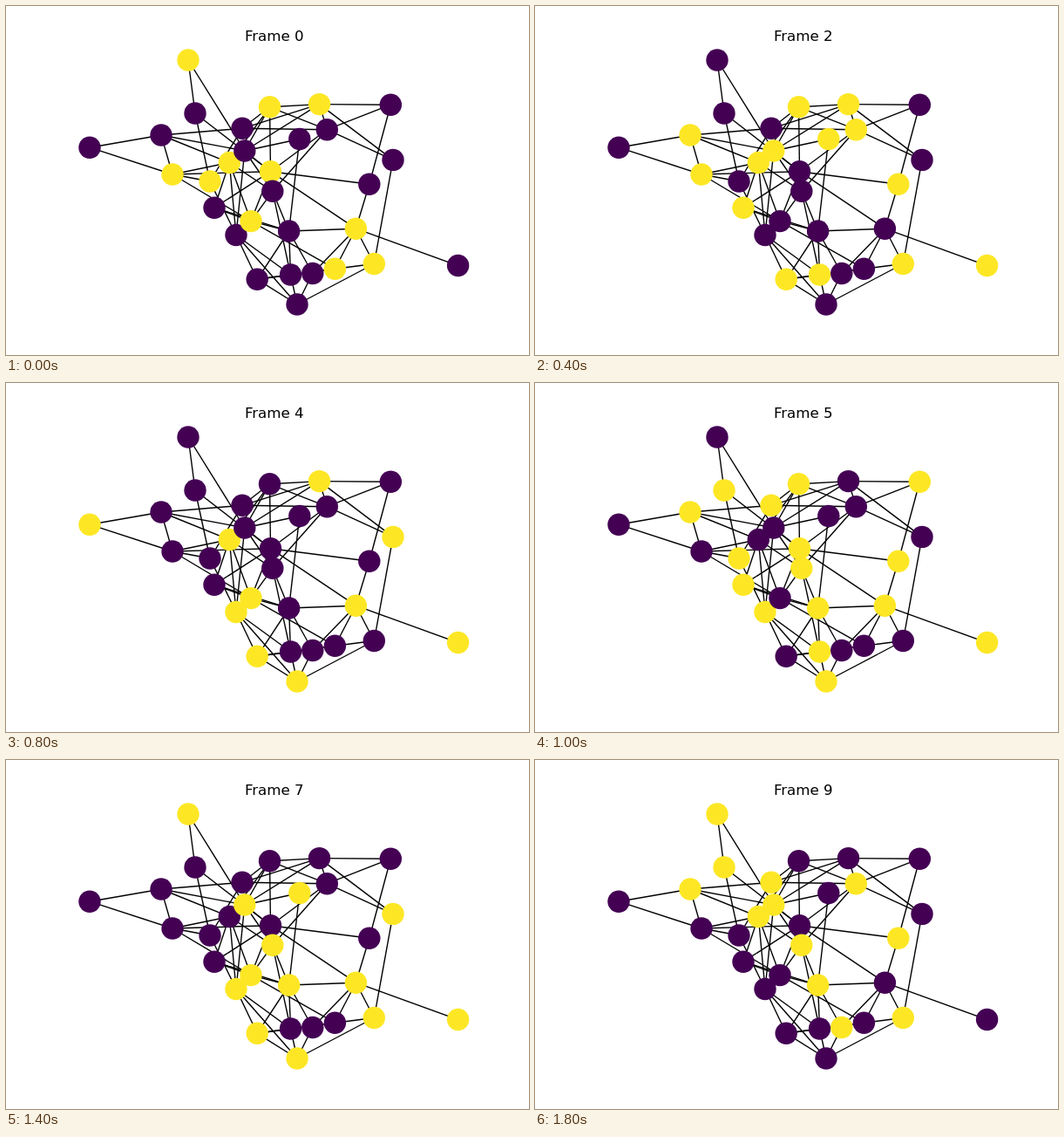
Recreate the animation shown at these times as an HTML page. Size 600 px wide and 400 px high, loop 2000 ms.

```html
<!DOCTYPE html>
<html lang="en">
<head>
<meta charset="utf-8">
<title>Network states</title>
<style>
  html, body { margin: 0; width: 100%; height: 100%; overflow: hidden; background: #fff; }
  svg { display: block; }
  text { font: 16.67px "DejaVu Sans", sans-serif; text-anchor: middle; }
  line { stroke: #000; stroke-width: 1.39; }
</style>
</head>
<body>
<svg id="stage" width="600" height="400" viewBox="0 0 600 400">
  <text id="title" x="307.8" y="40"></text>
</svg>
<script>
const STEP = 200;
const OFF = '#440154', ON = '#fde725';

const nodes = [
  [209, 62], [217, 123], [178, 148], [96, 162.2], [191, 193],
  [234, 201], [256.3, 179.5], [271, 140.3], [273.8, 166], [302.5, 115.8],
  [359.5, 112.6], [368.3, 141.7], [336.8, 152.5], [441.3, 113.2], [444, 176.4],
  [416.8, 204.3], [303.5, 189.7], [305.8, 212.3], [239, 231.2], [264, 262.5],
  [281, 246.6], [324.6, 258], [401.4, 255.2], [288.2, 313.3], [326.5, 308],
  [351.8, 306.5], [377.4, 301.2], [422.3, 295.5], [334, 342], [518.6, 297.5]
];

// Neighbours of each node, each edge listed once.
const links = [
  [1, 8], [5, 16], [3, 4, 6, 7, 8], [4], [5, 6, 16, 20],
  [7, 19], [9, 17, 18, 19, 20], [9, 10, 11], [9, 10, 12, 16, 17, 19], [10, 11, 16],
  [11, 13, 14], [13, 14, 16, 17], [21], [15], [27],
  [16, 22], [18, 20, 22], [20, 21, 24], [20, 21], [23, 24, 28],
  [21, 26], [22, 23, 24, 25], [25, 26, 27, 29], [24, 26, 28], [28],
  [28], [27], [28]
];

// Nodes that are lit in each step.
const lit = [
  [0, 4, 5, 6, 9, 10, 16, 20, 22, 26, 27],
  [5, 9, 11, 14, 16, 18, 19, 22, 25, 28],
  [2, 4, 6, 8, 9, 10, 11, 12, 15, 18, 23, 24, 27, 29],
  [0, 2, 3, 7, 19, 20, 21, 22, 25, 26, 29],
  [3, 6, 10, 14, 19, 20, 22, 23, 28, 29],
  [1, 2, 5, 7, 9, 13, 15, 16, 17, 18, 19, 21, 22, 24, 28, 29],
  [0, 1, 5, 9, 16, 19, 21, 22, 24, 27],
  [0, 8, 12, 14, 17, 19, 20, 21, 22, 23, 27, 28, 29],
  [0, 3, 7, 8, 14, 17, 21, 22, 25, 29],
  [0, 1, 2, 6, 7, 8, 11, 15, 17, 21, 25, 27]
];

const stage = document.getElementById('stage');
const title = document.getElementById('title');

function add(tag, attrs) {
  const el = document.createElementNS('http://www.w3.org/2000/svg', tag);
  for (const key in attrs) el.setAttribute(key, attrs[key]);
  return stage.appendChild(el);
}

links.forEach((ends, i) => ends.forEach(j => {
  const [x1, y1] = nodes[i], [x2, y2] = nodes[j];
  add('line', { x1, y1, x2, y2 });
}));
const dots = nodes.map(([cx, cy]) => add('circle', { cx, cy, r: 12.7 }));

let shown = -1;
function show(step) {
  if (step === shown) return;
  shown = step;
  title.textContent = 'Frame ' + step;
  dots.forEach((dot, i) => dot.setAttribute('fill', lit[step].includes(i) ? ON : OFF));
}

const start = performance.now();
function tick() {
  show(Math.floor((performance.now() - start) / STEP) % lit.length);
  requestAnimationFrame(tick);
}
tick();
</script>
</body>
</html>
```
